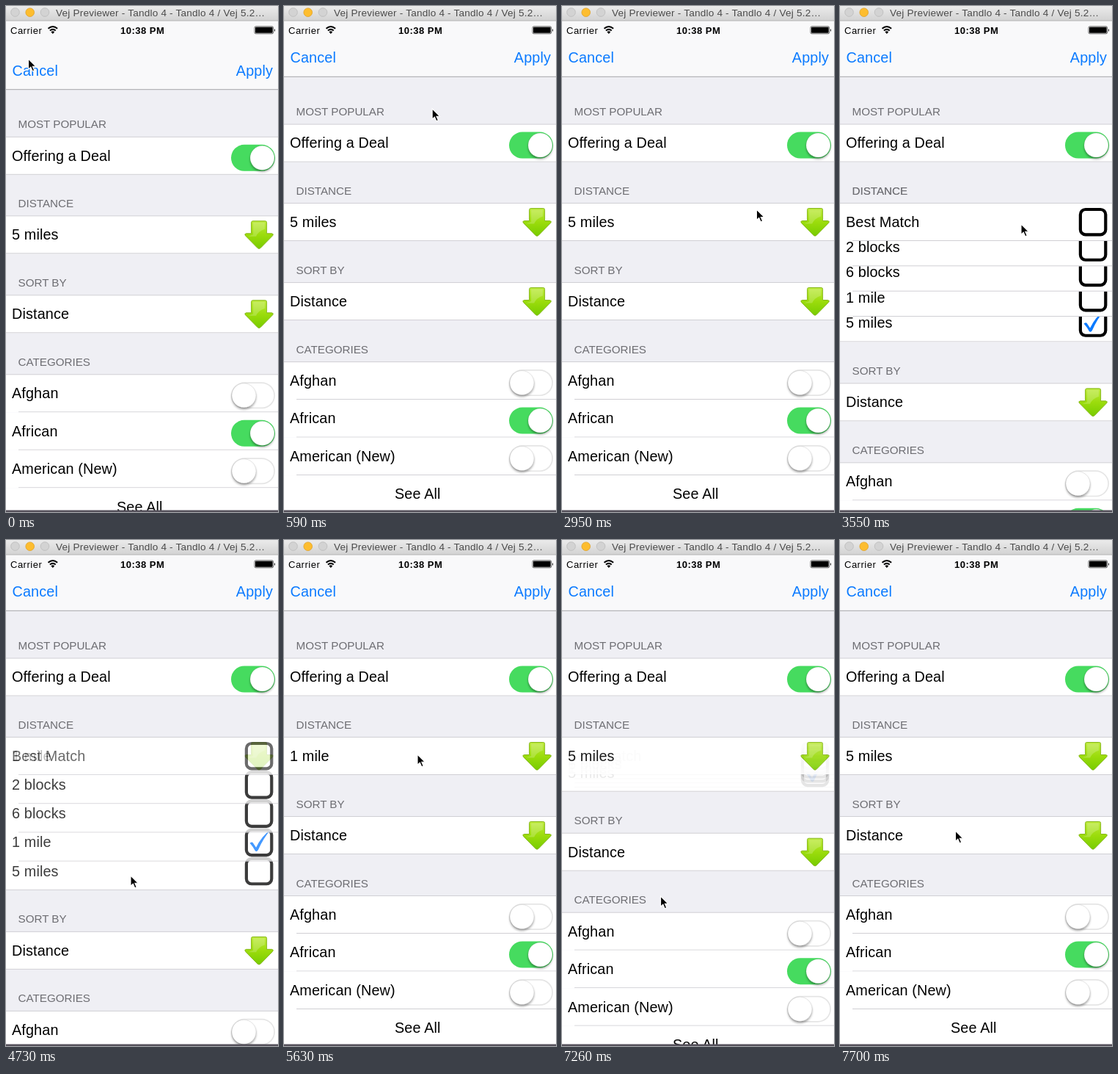
Recreate the animation shown at these times as an HTML page. Size 371 by 689 pixels, loop 8000 ms.

```html
<!DOCTYPE html>
<html lang="en">
<head>
<meta charset="utf-8">
<title>Filter settings</title>
<style>
html, body { margin: 0; width: 100%; height: 100%; overflow: hidden; background: #fafafa; }
svg { display: block; width: 371px; height: 689px; }
text { font-family: "Liberation Sans", Arial, sans-serif; font-size: 19.8px; letter-spacing: .14px; }
.head { font-size: 15.2px; letter-spacing: 0; fill: #6d6d72; }
.link { fill: #0a7aff; }
.status { font-size: 13px; letter-spacing: .5px; }
.bar { font-size: 13.6px; letter-spacing: .2px; fill: #4b4b4b; }
</style>
</head>
<body>
<svg viewBox="0 0 371 689">
  <defs>
    <linearGradient id="chrome" x2="0" y2="1">
      <stop stop-color="#ebebeb"/><stop offset="1" stop-color="#d2d2d2"/>
    </linearGradient>
    <linearGradient id="leaf" x2="0" y2="1">
      <stop stop-color="#bdea3c"/><stop offset=".5" stop-color="#9bdc0c"/><stop offset="1" stop-color="#78cc00"/>
    </linearGradient>
    <filter id="drop" x="-40%" y="-40%" width="180%" height="190%">
      <feDropShadow dx="0" dy="2.4" stdDeviation="1.7" flood-opacity=".36"/>
    </filter>
    <g id="arrow">
      <path d="M-8.5-19H8.5Q10.5-19 10.5-17V-2H17.5Q20.5-1.5 18.5 1L2 17.8Q0 19.5-2 17.8L-18.5 1Q-20.5-1.5-17.5-2H-10.5V-17Q-10.5-19-8.5-19Z" fill="url(#leaf)" stroke="#86b81a"/>
      <path d="M-8-17H8V-8Q-1-5-4 2H-15L-8-.5Z" fill="#fff" opacity=".2"/>
    </g>
    <rect id="box" x="-17.2" y="-17.2" width="34.4" height="34.4" rx="7" fill="#fff" stroke="#000" stroke-width="4.2"/>
    <path id="tick" d="M-12.5 1Q-9.5-1.5-8 1L-4 7Q3-8 16.5-18Q6-6-1 10Q-3 13.5-5.2 11.5Q-8 6-12.5 1Z" fill="#0a7aff"/>
  </defs>
  <g id="screen"></g>
  <g>
    <rect width="371" height="20" fill="url(#chrome)"/>
    <path d="M0 20H371" stroke="#b4b4b4"/>
    <g stroke-width=".8">
      <circle cx="12.5" cy="8.5" r="5.8" fill="#d3d3d3" stroke="#b9b9b9"/>
      <circle cx="32.7" cy="8.7" r="5.8" fill="#fdbd2f" stroke="#e0a024"/>
      <circle cx="53" cy="8.5" r="5.8" fill="#d3d3d3" stroke="#b9b9b9"/>
    </g>
    <text class="bar" x="68" y="14">Vej Previewer - Tandlo 4 - Tandlo 4 / Vej 5.2…</text>
    <text class="status" x="6" y="37.5">Carrier</text>
    <text class="status" x="156" y="37.5" font-weight="700">10:38 PM</text>
    <g fill="none" stroke="#000" stroke-width="2">
      <path d="M57.5 30.8Q63.8 25.2 70.1 30.8M59.9 33.6Q63.8 30.2 67.7 33.6"/>
    </g>
    <path d="M61.4 35.2Q63.8 33.4 66.2 35.2L63.8 38Z"/>
    <rect x="339" y="27.8" width="25.6" height="10" rx="1.8" fill="none" stroke="#000" stroke-width=".6"/>
    <rect x="340" y="28.8" width="23.6" height="8" rx=".8"/>
    <path d="M366 31Q368 33 366 35Z"/>
    <rect y="686.5" width="371" height="2.5" fill="#56525c"/>
  </g>
  <path id="cursor" d="M0 0V14.2L3.3 11.2L5.7 16.8L8.2 15.7L5.8 10.3H10.3Z" stroke="#fff" stroke-width="1.1"/>
</svg>
<script>
const LOOP = 8000, STEP = LOOP / 54;
const ROW = 51.5, SPAN = 108, TOP = 161;
const DISTANCES = ["Best Match", "2 blocks", "6 blocks", "1 mile", "5 miles"];
const OPENINGS = [3390, 5860], CLOSINGS = [4655, 7045], FOLD = 270;
const PATH = [[90, 30.5, 72], [1030, 341.5, 195], [2260, 341.5, 195], [3240, 247, 297],
  [3600, 247, 297], [4280, 170, 457], [4760, 170, 457], [5630, 182, 292],
  [6000, 182, 292], [6660, 133, 491], [7180, 133, 491], [7700, 157.5, 396]];

const screenEl = document.getElementById("screen");
const cursorEl = document.getElementById("cursor");

const ease = (t, start, length) => {
  const u = Math.min(1, Math.max(0, (t - start) / length));
  return u * u * (3 - 2 * u);
};
const bump = (t, start, length) =>
  t > start && t < start + length ? Math.sin(Math.PI * (t - start) / length) : 0;
const mix = (a, b, k) => a + (b - a) * k;

const group = (x, y, body, alpha = 1) =>
  `<g transform="translate(${x} ${y})" opacity="${alpha}">${body}</g>`;
const use = (id, y) => `<use href="#${id}" x="345.1" y="${y}"/>`;
const line = (y, x = 0) => `<path d="M${x} ${y}H371" stroke="#d0cfd4"/>`;
const sheet = (y, h) => `<rect y="${y}" width="371" height="${h}" fill="#fff"/>`;
const label = (s, x = 8) => `<text x="${x}" y="32.3">${s}</text>`;
const header = (s, y, alpha = 1) =>
  `<text class="head" x="16.5" y="${y - 12}" opacity="${alpha}">${s}</text>`;

// on: knob position and tint, hole: size of the white inset, stretch: extra knob width
function toggle(on, hole = 1 - on, stretch = 0) {
  const tint = [[229, 70], [229, 219], [229, 95]].map(([a, b]) => Math.round(mix(a, b, on)));
  const w = 56.6 * hole, h = 32.6 * hole;
  return `<rect x="307" y="10.5" width="60" height="36" rx="18" fill="rgb(${tint})"/>
    <rect x="${337 - w / 2}" y="${28.5 - h / 2}" width="${w}" height="${h}" rx="${h / 2}" fill="#fff"/>
    <rect x="${308 + (25 - stretch) * on}" y="12" width="${33 + stretch}" height="33" rx="16.5"
      fill="#fff" stroke="#000" stroke-opacity=".16" stroke-width=".6" filter="url(#drop)"/>`;
}

function dealRow(t) {
  const on = 1 - ease(t, 1250, 300) + ease(t, 1890, 300);
  const hole = ease(t, 1300, 300) - ease(t, 1710, 250);
  const stretch = 6 * (bump(t, 1150, 380) + bump(t, 1790, 400));
  return group(0, TOP, sheet(0, ROW) + line(0) + line(ROW - .5) + label("Offering a Deal") +
    toggle(on, hole, stretch));
}

function distanceRows(t, open, closing) {
  const top = TOP + SPAN - .5;
  const picked = t >= CLOSINGS[0] && t < CLOSINGS[1] ? 3 : 4;
  const fade = closing ? open : 1;
  const cover = closing ? 1 - open : Math.max(0, 1 - open / .4);
  let out = sheet(top, ROW * (1 + 4 * open));
  // each row slides out from under the one above it
  if (open > 0) for (let i = 4; i >= 0; i--) {
    out += group(0, top + i * ROW * open, sheet(0, ROW) + label(DISTANCES[i]) + use("box", 25.7) +
      (i === picked ? use("tick", 25.7) : "") + (i < 4 ? line(ROW - .5, 17) : ""), fade);
  }
  if (cover > 0) {
    out += group(0, top, sheet(0, ROW - 1) + label(DISTANCES[picked]) + use("arrow", 26), cover);
  }
  return out + line(top) + line(top + ROW * (1 + 4 * open) - .5);
}

function lowerSections() {
  const sort = TOP + 2 * SPAN - .5, list = TOP + 3 * SPAN - .5;
  const names = ["Afghan", "African", "American (New)"];
  return header("SORT BY", sort) + header("CATEGORIES", list) +
    group(0, sort, sheet(0, ROW) + line(0) + line(ROW - .5) + label("Distance") + use("arrow", 26)) +
    names.map((s, i) => group(0, list + i * ROW,
      sheet(0, ROW) + label(s) + toggle(i === 1 ? 1 : 0) + line(ROW - .5, 17))).join("") +
    group(0, list + 3 * ROW, sheet(0, ROW) + label("See All", 151)) + line(list);
}

function cursorAt(t) {
  let i = 0;
  while (i < PATH.length - 2 && t > PATH[i + 1][0]) i++;
  const [t0, x0, y0] = PATH[i], [t1, x1, y1] = PATH[i + 1];
  const k = ease(t, t0, t1 - t0);
  return [mix(x0, x1, k), mix(y0, y1, k)];
}

function draw(t) {
  const sum = starts => starts.reduce((n, s) => n + ease(t, s, FOLD), 0);
  const open = Math.max(0, sum(OPENINGS) - sum(CLOSINGS));
  const closing = CLOSINGS.some(s => t >= s && t < s + FOLD);
  const glow = closing ? 0 : .8 * Math.sin(Math.PI * open);
  const rise = t < 600 ? 17.3 * Math.exp(-t / 110) : 0;
  screenEl.innerHTML = group(0, rise,
    `<rect y="96" width="371" height="600" fill="#efeff4"/>
     <rect y="-20" width="371" height="116" fill="#f9f9fa"/>
     <path d="M0 96.3H371" stroke="#b5b5b8" stroke-width="1.2"/>
     <text class="link" x="8.5" y="77.3">Cancel</text>
     <text class="link" x="364" y="77.3" text-anchor="end">Apply</text>` +
    header("MOST POPULAR", TOP) + dealRow(t) +
    header("DISTANCE", TOP + SPAN) + header("DISTANCE", TOP + SPAN, glow) +
    distanceRows(t, open, closing) +
    group(0, 4 * ROW * open, lowerSections()));
  cursorEl.setAttribute("transform", `translate(${cursorAt(t)})`);
}

let last = -1;
const begin = performance.now();
function tick() {
  const t = (performance.now() - begin) % LOOP;
  const step = Math.floor((t + 12) / STEP) % 54;
  if (step !== last) draw((last = step) * STEP);
  requestAnimationFrame(tick);
}
tick();
</script>
</body>
</html>
```
